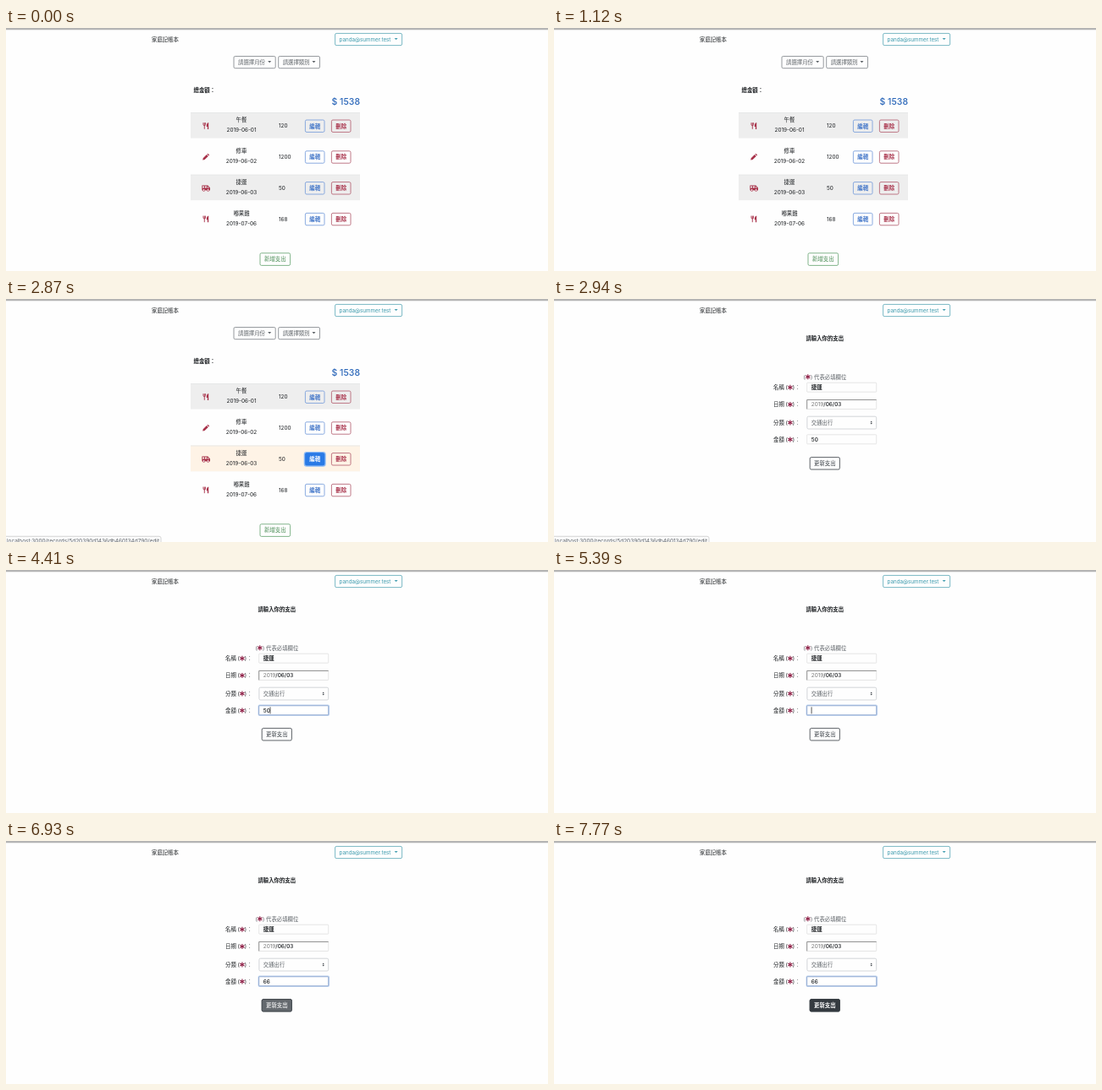
Recreate the animation shown at these times as an HTML page. Size 640 px wide and 288 px high, loop 8 s.

```html
<!DOCTYPE html>
<html lang="zh-Hant">
<head>
<meta charset="utf-8">
<style>
  html, body { margin: 0; width: 100%; height: 100%; overflow: hidden; background: #fefefe; }
  svg { display: block; width: 100%; height: 100%; }
  text { font-family: Inter, "Noto Sans CJK TC", "Noto Sans CJK", sans-serif; white-space: pre; }
</style>
</head>
<body>
<svg id="stage" viewBox="0 0 640 288"></svg>
<script>
const RED = '#a8324a', STAR = '#8c1a42', INK = '#1c1f22', GREY = '#5c6166';
const BLUE = '#3f74c8', DARK = '#343a40';

// cy is the vertical centre of the glyphs
const text = (x, cy, s, { fill = INK, size = 6.4, weight = 400, anchor = 'start', id = '' } = {}) =>
  `<text ${id && `id="${id}"`} x="${x}" y="${cy + size * .37}" font-size="${size}" font-weight="${weight}"
    fill="${fill}" text-anchor="${anchor}">${s}</text>`;
const box = (x, y, w, h, stroke, { fill = 'none', r = 1.6, sw = .8 } = {}) =>
  `<rect x="${x}" y="${y}" width="${w}" height="${h}" rx="${r}" fill="${fill}" stroke="${stroke}" stroke-width="${sw}"/>`;
const group = (id, body) => `<g id="${id}">${body}</g>`;
const button = (x, y, w, h, label, line, fill = line, weight = 500, bg = 'none') =>
  box(x, y, w, h, line, { fill: bg }) +
  text(x + w / 2, y + h / 2, label, { fill, weight, anchor: 'middle' });
const arrow = (x, y, fill) => `<path d="M${x - 2} ${y - 1}h4l-2 2.1z" fill="${fill}"/>`;
const dropdown = (x, y, w, label, line, fill, size = 6.4) =>
  box(x, y, w, 14.2, line) + text(x + 5, y + 7.1, label, { fill, size }) + arrow(x + w - 7, y + 6.6, fill);

const icons = {
  fork: `<path d="M-3 -3.8v2.4q0 1 1.3 1q1.3 0 1.3 -1v-2.4M-1.7 -3.8v7.6" fill="none" stroke="${RED}" stroke-width=".9"/>
    <path d="M3.2 -3.9v7.8h-1.3v-3h-1.2q0 -4 2.5 -4.8z" fill="${RED}"/>`,
  pen: `<path d="M-3.8 3.8l.5 -2.4 4.2 -4.2 1.9 1.9 -4.2 4.2zM1.5 -3.3l.8 -.7 1.8 1.8 -.8 .8z" fill="${RED}"/>`,
  van: `<path d="M-4.6 -3h7l2.6 2.8v2.8h-9.6zM-3.8 -2v1.8h1.9v-1.8zM-1 -2v1.8h1.9v-1.8zM1.8 -2v1.8h2z"
    fill="${RED}" fill-rule="evenodd"/>` +
    [-2.4, 2.6].map(x => `<circle cx="${x}" cy="2.5" r="1.3" fill="#fff" stroke="${RED}" stroke-width=".8"/>`).join('')
};

const rows = [
  ['fork', '午餐', '2019-06-01', 120],
  ['pen', '修車', '2019-06-02', 1200],
  ['van', '捷運', '2019-06-03', 50],
  ['fork', '嘟果雞', '2019-07-06', 168]
];
const band = (y, fill) =>
  `<path d="M218 ${y}h200v30.4h-200z" fill="${fill}"/><path d="M218 ${y + .3}h200" stroke="#dfe1e3" stroke-width=".6"/>`;
const row = ([icon, name, date, sum], i) => {
  const y = 116 + i * 36.8;
  const mid = { anchor: 'middle' };
  return (i % 2 ? '' : band(y - 15.8, '#eeeeee')) +
    (i == 2 ? group('hover', band(y - 15.8, '#fef3e6')) : '') +
    `<g transform="translate(236 ${y})">${icons[icon]}</g>` +
    text(278, y - 7.2, name, { ...mid, weight: 500 }) +
    text(278, y + 4.8, date, mid) +
    text(322, y - .2, sum) +
    button(353.4, y - 7, 22.6, 14.4, '編輯', '#6f97da', BLUE, 700) +
    button(384.4, y - 7, 22.6, 14.4, '刪除', '#b0586a', RED, 700) +
    (i == 2 ? group('ring', box(352.6, y - 7.8, 24.2, 16, '#8fbcf6', { r: 2.4, sw: 1.8 })) +
      group('edit', button(353.4, y - 7, 22.6, 14.4, '編輯', '#2a7ae6', '#fff', 700, '#2a7ae6')) : '');
};

const star = (x, y) => {
  const spokes = [0, 60, 120].map(a => `<path d="M0 -3v6" transform="rotate(${a})"/>`).join('');
  return `<g transform="translate(${x} ${y})" stroke="${STAR}" stroke-width="1.1">${spokes}</g>`;
};
const label = (y, s) => text(259, y, s, { weight: 500 }) + text(273.6, y, '(') + star(278.9, y) +
  text(281.8, y, ')') + text(284.6, y, '：');

const header = `<path d="M0 0h640v2.2h-640z" fill="#b4b4b4"/>` +
  text(172, 13.2, '家庭記帳本') +
  dropdown(388.6, 6.4, 79, 'panda@summer.test', '#5aa7b6', '#3c9aad', 6.25);

const list = dropdown(269, 33.5, 49.2, '請選擇月份', '#7b8086', GREY) +
  dropdown(321.7, 33.5, 48.8, '請選擇類別', '#7b8086', GREY) +
  text(221.6, 74, '總金額：', { weight: 700 }) +
  text(418, 87.5, '$ 1538', { fill: '#2b67b9', size: 10.5, weight: 500, anchor: 'end' }) +
  rows.map(row).join('') +
  button(300, 266.8, 35.6, 14.6, '新增支出', '#62a36e', '#468b52');

const field = { r: .6, sw: .7 };
const form = text(319.8, 46.2, '請輸入你的支出', { weight: 700, anchor: 'middle' }) +
  text(294.6, 92.3, '(', { fill: GREY }) + star(299.8, 92.2) + text(302.9, 92.3, ')', { fill: GREY }) +
  text(307, 92.3, '代表必填欄位', { fill: GREY }) +
  label(104.8, '名稱') + box(298.7, 99.2, 82, 11, '#dcdcdc', field) + text(303.8, 104.8, '捷運', { weight: 700 }) +
  label(125, '日期') + box(298.7, 119.5, 82, 11, '#dcdcdc', field) +
  `<path d="M298.7 130.5v-11h82" fill="none" stroke="#7c7c7c" stroke-width=".8"/>` +
  text(303.8, 125, '<tspan fill="#777">2019</tspan><tspan font-weight="500">/06/03</tspan>') +
  label(146.4, '分類') + box(298.9, 139.2, 81.8, 14.8, '#c8ccd0') + text(303.8, 146.6, '交通出行', { fill: GREY }) +
  `<path d="M373.6 146.2l1.1 -1.6 1.1 1.6zM373.6 147l1.1 1.6 1.1 -1.6z" fill="${DARK}"/>` +
  label(166.6, '金額') + box(298.7, 160.8, 82, 11, '#dcdcdc', field) +
  group('focus', box(298.4, 160.4, 82.8, 11.6, '#c3d6f0', { r: 1, sw: 1.8 }) +
    box(298.7, 160.8, 82, 11, '#6f8fc2', { ...field, fill: '#fff' })) +
  text(303.8, 166.5, '', { id: 'amount', weight: 500 }) +
  `<path id="caret" d="M.3 162.4v8" stroke="#111" stroke-width=".7"/>` +
  button(302.2, 187.6, 35.2, 14.4, '更新支出', DARK, DARK) +
  group('submit', button(302.2, 187.6, 35.2, 14.4, '更新支出', DARK, '#fff', 700, DARK));

const status = `<path d="M-1 289v-7.7h182q2 0 2 2v5.7z" fill="#fbfbfb" stroke="#c4c4c4" stroke-width=".7"/>` +
  text(181, 286.3, 'localhost:3000/records/5d20390d1436db460134d790/edit', { fill: '#5f6468', size: 6.45, anchor: 'end' });

stage.innerHTML = header + group('list', list) + group('form', form) + group('status', status);

const $ = id => document.getElementById(id);
const fade = (t, start, ms) => Math.min(1, Math.max(0, (t - start) / ms));
const show = (id, v) => $(id).setAttribute('opacity', +v);

// [time, typed amount]
const typing = [[0, '50'], [5250, '5'], [5390, ''], [6020, '6'], [6160, '66']];
// times at which the caret switches on and off
const blinks = [4410, 4900, 5250, 5950, 6020, 6720, 7210, 7770];

function draw() {
  const t = (performance.now() + 15) % 8000;
  const onForm = t >= 2940;
  show('list', !onForm);
  show('form', onForm);
  show('hover', t >= 1610);
  show('edit', fade(t, 1650, 150));
  show('ring', fade(t, 2500, 150));
  show('status', fade(t, 1920, 110) - fade(t, 2990, 150));
  show('focus', t >= 4410);
  show('submit', fade(t, 6810, 180));
  const value = typing.filter(k => t >= k[0]).pop()[1];
  $('amount').textContent = value;
  show('caret', blinks.filter(b => t >= b).length % 2);
  $('caret').setAttribute('transform', `translate(${303.8 + value.length * 3.95} 0)`);
  requestAnimationFrame(draw);
}
draw();
</script>
</body>
</html>
```
